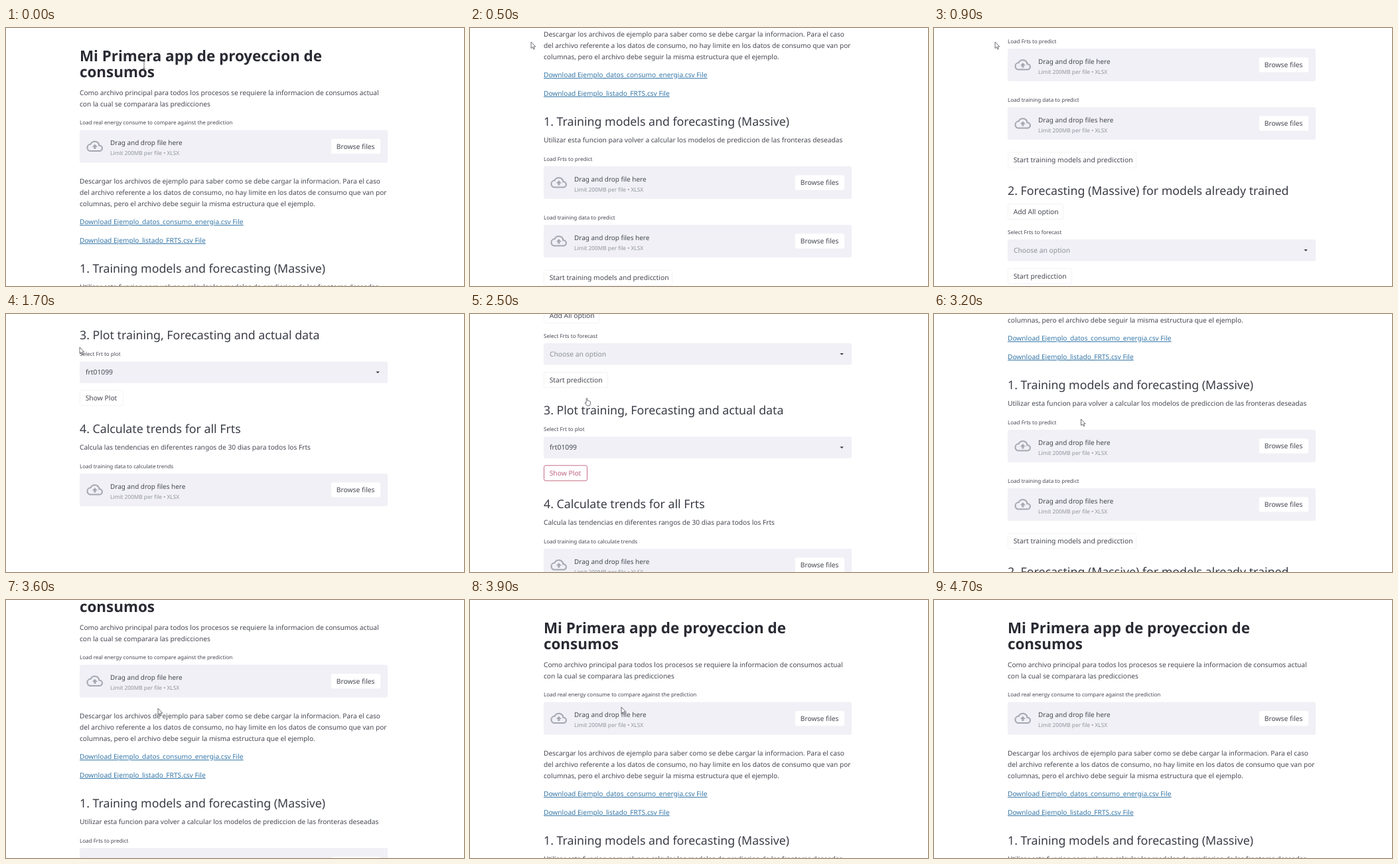
An HTML page for the animation above (4.9 s loop, 690 px wide and 388 px high).

```html
<!DOCTYPE html>
<html lang="es">
<head>
<meta charset="utf-8">
<style>
  html, body { margin: 0; width: 100%; height: 100%; overflow: hidden; background: #fff; }
  svg { display: block; width: 690px; height: 388px; }
  text { font-family: "Noto Sans", sans-serif; font-size: 10.16px; fill: #464852; text-rendering: geometricPrecision; white-space: pre; }
  .title { font-size: 22.4px; font-weight: 700; fill: #292a33; }
  .heading { font-size: 17.76px; fill: #3a3c46; }
  .label { font-size: 8.05px; }
  .drop { font-size: 9.95px; }
  .caption { font-size: 8.3px; fill: #92949e; }
  .control { font-size: 10.3px; }
  .hint { font-size: 10.3px; fill: #8d8f99; }
  .link { fill: #3577a8; text-decoration: underline; }
  .box { fill: #f0f0f6; }
  .button { fill: #fff; stroke: #f3f3f6; }
  .icon { fill: none; stroke: #a5a7b1; stroke-width: 2; }
  .icon .arrow { fill: #a5a7b1; stroke: none; }
  .active rect { stroke: #c66f88; }
  .active text { fill: #c0637e; }
  #cursor path { fill: #fff; stroke: #4a4b52; stroke-width: .8; stroke-linejoin: round; }
</style>
</head>
<body>
<svg viewBox="0 0 690 388">
  <g id="page"></g>
  <g id="cursor">
    <path id="arrow" d="M0 0V9.6L2.2 7.6L3.8 11L5.3 10.4L3.8 7.1H6.7Z"/>
    <path id="hand" d="M2.2 6.5V1.2Q3.1 0 4 1.2V4.5Q5 3.8 5.6 4.8Q6.6 4.2 7.1 5.2Q8.2 4.8 8.3 6V9L7.3 12H3.2L.3 8Q0 6.4 2.2 7.6Z"/>
    <path id="beam" d="M-2 0H2M0 0V11M-2 11H2"/>
  </g>
</svg>
<script>
const LEFT = 111, WIDTH = 464, LOOP = 4900, STEP = 100;
const $ = id => document.getElementById(id);

// All y values of text are the middle of its capitals.
const text = (y, content, kind = "body", x = LEFT) =>
  `<text class="${kind}" x="${x}" y="${y}" dy=".36em">${content}</text>`;

const box = (y, height) =>
  `<rect class="box" x="${LEFT}" y="${y}" width="${WIDTH}" height="${height}" rx="2.5"/>`;

const button = (y, width, content, x = LEFT, id = "") =>
  `<g id="${id}"><rect class="button" x="${x + .5}" y="${y - 11.5}" width="${width - 1}" height="23" rx="2.5"/>` +
  text(y, content, "control", x + 8.7) + "</g>";

const uploader = (y, files) => box(y, 49) +
  `<g class="icon" transform="translate(121.5 ${y + 12}) scale(1.03)">
    <path d="M6 19A5 5 0 0 1 5.8 9A6.6 6.6 0 0 1 18.4 11A4 4 0 0 1 19 19Z"/>
    <path class="arrow" d="M8 13H10.6V16H13.4V13H16L12 9Z"/></g>` +
  text(y + 19, `Drag and drop ${files} here`, "drop", 157) +
  text(y + 34.8, "Limit 200MB per file • XLSX", "caption", 157) +
  button(y + 24.5, 76, "Browse files", 489);

const select = (y, content, kind) => box(y, 32.5) +
  text(y + 16, content, kind, 120) +
  `<path d="M557.4 ${y + 15}h5.4l-2.7 2.8z" fill="#31333f"/>`;

$("page").innerHTML = [
  text(42, "Mi Primera app de proyeccion de", "title"),
  text(66, "consumos", "title"),
  text(97.3, "Como archivo principal para todos los procesos se requiere la informacion de consumos actual"),
  text(114.3, "con la cual se comparara las predicciones"),
  text(142.5, "Load real energy consume to compare against the prediction", "label"),
  uploader(153.5, "file"),
  text(230, "Descargar los archivos de ejemplo para saber como se debe cargar la informacion. Para el caso"),
  text(247, "del archivo referente a los datos de consumo, no hay limite en los datos de consumo que van por"),
  text(264, "columnas, pero el archivo debe seguir la misma estructura que el ejemplo."),
  text(291.5, "Download Ejemplo_datos_consumo_energia.csv File", "link"),
  text(319.2, "Download Ejemplo_listado_FRTS.csv File", "link"),

  text(362, "1. Training models and forecasting (Massive)", "heading"),
  text(389.8, "Utilizar esta funcion para volver a calcular los modelos de prediccion de las fronteras deseadas"),
  text(418, "Load Frts to predict", "label"),
  uploader(429, "file"),
  text(506, "Load training data to predict", "label"),
  uploader(517, "files"),
  button(596.5, 194, "Start training models and predicction"),

  text(643, "2. Forecasting (Massive) for models already trained", "heading"),
  button(674, 84, "Add All option"),
  text(705.3, "Select Frts to forecast", "label"),
  select(716, "Choose an option", "hint"),
  button(771, 97, "Start predicction"),

  text(816.3, "3. Plot training, Forecasting and actual data", "heading"),
  text(845, "Select Frt to plot", "label"),
  select(856.5, "frt01099", "control"),
  button(911.3, 66, "Show Plot", LEFT, "plot"),

  text(958, "4. Calculate trends for all Frts", "heading"),
  text(985.5, "Calcula las tendencias en diferentes rangos de 30 dias para todos los Frts"),
  text(1014, "Load training data to calculate trends", "label"),
  uploader(1025, "files"),
].join("");

// Keys: [time, value, ...]
const scrollKeys = [
  [0, 0], [900, 398], [1700, 785], [2100, 785], [2300, 750],
  [2500, 672], [3200, 255], [3600, 56], [3800, 0],
];
const cursorKeys = [
  [0, 208, 50], [500, 92, 21], [900, 92, 21], [1200, 103, 36], [1700, 111, 50],
  [1800, 111, 50], [1900, 268, 165], [2000, 173, 126], [2600, 173, 126],
  [3200, 221.5, 158], [3600, 229, 163], [3900, 228, 161], [4200, 437, 377],
  [4500, 346, 306], [4600, 302, 263],
];

function at(keys, time) {
  const next = keys.findIndex(key => key[0] > time);
  if (next < 0) return keys.at(-1).slice(1);
  const a = keys[next - 1], b = keys[next];
  const part = (time - a[0]) / (b[0] - a[0]);
  return a.slice(1).map((value, i) => value + (b[i + 1] - value) * part);
}

function draw(now) {
  const time = Math.floor(now % LOOP / STEP) * STEP;
  const [scroll] = at(scrollKeys, time);
  const [x, y] = at(cursorKeys, time);
  $("page").setAttribute("transform", `translate(0 ${-Math.round(scroll)})`);
  $("cursor").setAttribute("transform", `translate(${x} ${y})`);
  $("plot").setAttribute("class", time >= 2000 ? "active" : "");

  const shape = time >= 4700 ? "" : time < 100 ? "beam" : time >= 2000 && time < 2600 ? "hand" : "arrow";
  for (const id of ["arrow", "hand", "beam"])
    $(id).style.display = id === shape ? "" : "none";
}

const start = performance.now();
function tick() {
  draw(performance.now() - start);
  requestAnimationFrame(tick);
}
tick();
</script>
</body>
</html>
```
